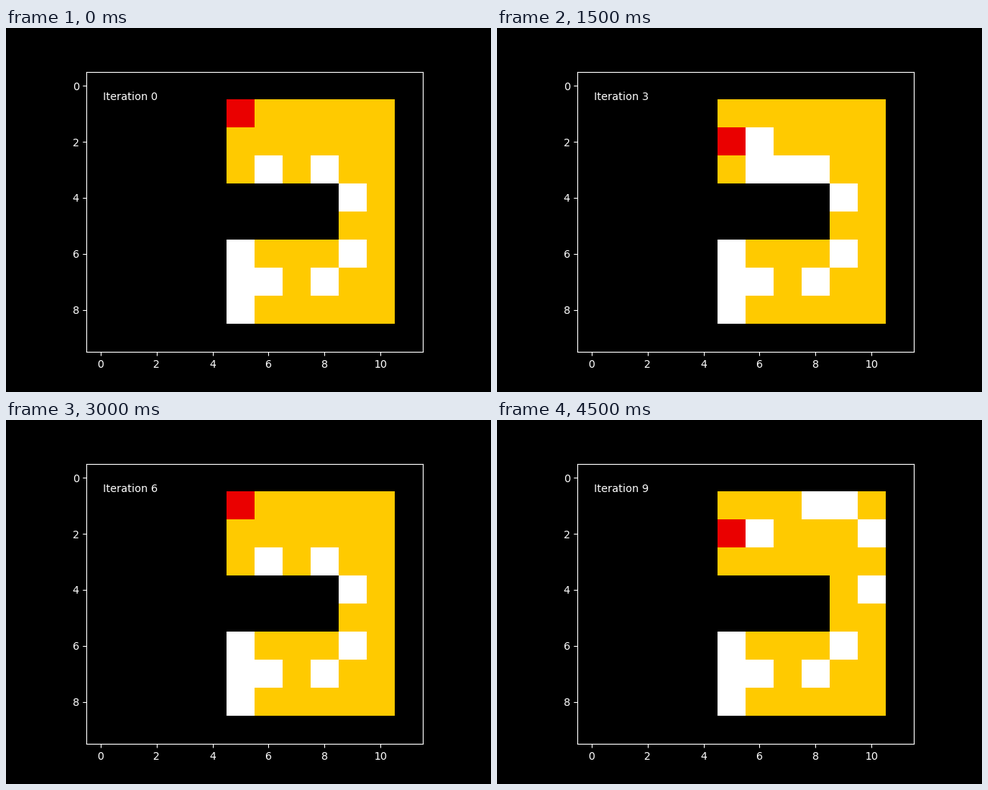
These frames come from a looping animation (640 by 480 pixels, 5000 ms). A matplotlib script:

```python
import matplotlib.pyplot as plt
import numpy as np
from matplotlib.animation import FuncAnimation
from matplotlib.colors import ListedColormap

plt.style.use("dark_background")

WALL, FINISH, ROAD, VISITED = range(4)
COLORS = ListedColormap(["#000000", "#ea0000", "#ffca00", "#ffffff"])

START = [(6, 5), (7, 5), (8, 5)]
OPENING = [(7, 6), (7, 8), (6, 9)]
BEND = [(4, 9), (3, 8), (3, 6)]

# Cells (row, column) each kind of run visits after the opening moves
DIRECT = BEND + [(1, 5)]
HIGH = BEND + [(1, 7), (1, 6), (1, 5)]
LOW = BEND + [(3, 7), (2, 6), (2, 5)]
DIP = BEND + [(3, 7), (1, 7), (2, 5)]
SLOW_HIGH = HIGH + [(3, 7)]
DOUBLE = BEND + [(3, 5), (1, 5)]
WIDE = [(4, 10), (2, 10), (1, 9), (1, 8), (2, 6), (2, 5)]

RUNS = [DIRECT, LOW, HIGH, LOW, DIP, SLOW_HIGH, DIRECT, LOW, DOUBLE, WIDE]


def empty_track():
    grid = np.full((10, 12), WALL)
    grid[1:9, 5:11] = ROAD
    grid[4:6, 5:9] = WALL
    return grid


def draw_run(run):
    grid = empty_track()
    for row, col in START + OPENING + run:
        at_finish = col == 5 and row < 4
        grid[row, col] = FINISH if at_finish else VISITED
    return grid


fig, ax = plt.subplots(figsize=(6.4, 4.8), dpi=100)
image = ax.imshow(draw_run(RUNS[0]), cmap=COLORS, vmin=0, vmax=3,
                  interpolation="nearest")
label = ax.text(0.05, 0.9, "", transform=ax.transAxes)


def update(i):
    image.set_data(draw_run(RUNS[i]))
    label.set_text(f"Iteration {i}")
    return image, label


anim = FuncAnimation(fig, update, frames=len(RUNS), interval=500,
                     init_func=lambda: update(0), repeat=True)
plt.show()
```
